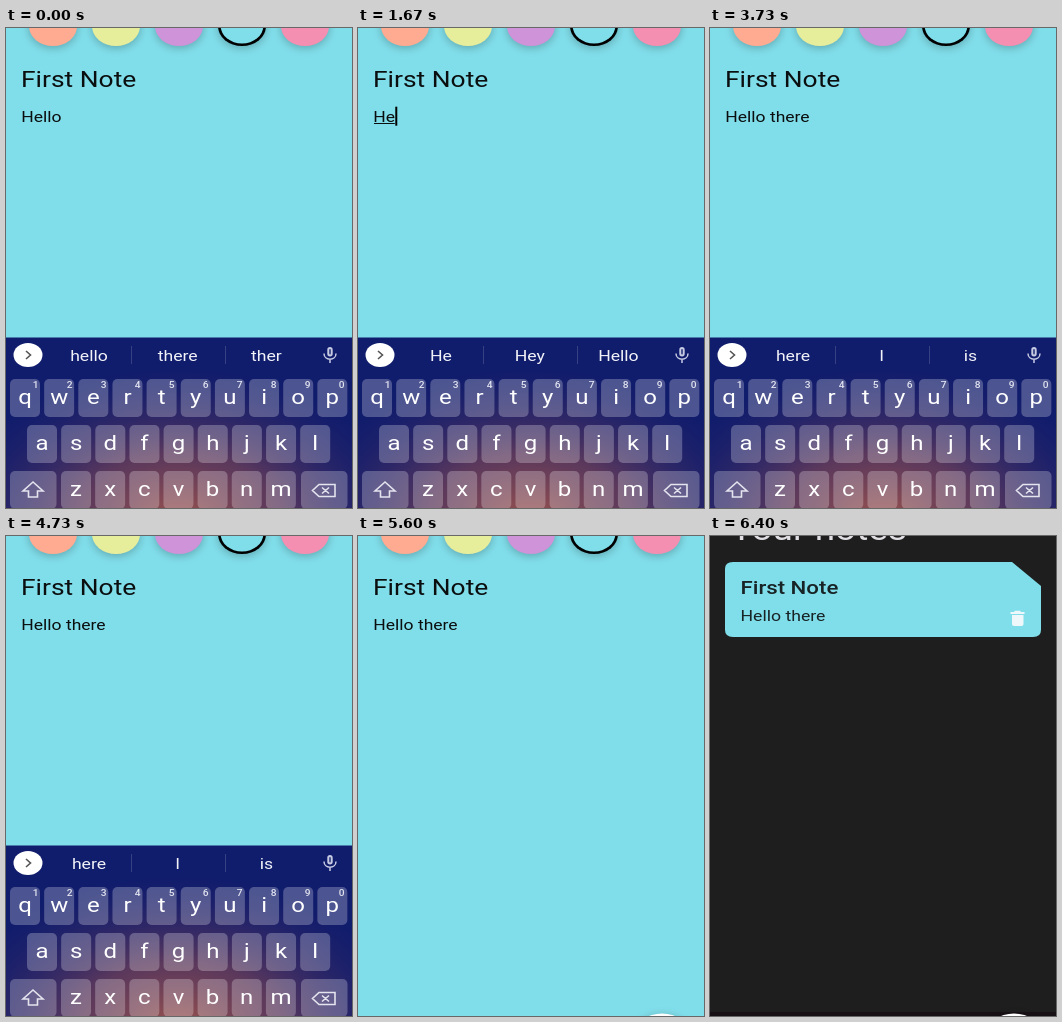
An HTML page with a canvas for the animation above (6470 ms loop, 346 by 480 pixels).

```html
<!DOCTYPE html>
<html lang="en">
<head>
<meta charset="utf-8">
<title>Note taking</title>
<style>
html, body { margin: 0; height: 100%; overflow: hidden; background: #80deea; }
canvas { display: block; width: 100vw; height: 100vh; }
</style>
</head>
<body>
<canvas></canvas>
<script>
const W = 346, H = 480, LOOP = 6470;
const STRETCH = 1.2;                 // the screen is squeezed vertically
const FONT = 'Roboto, Arial, sans-serif';
const TEAL = '#80deea', INK = '#0a0e0f', KEY = 'rgba(255,255,255,.25)', ICON = '#e4e4ee';
const PITCH = 34.15;
const canvas = document.querySelector('canvas');
const ctx = canvas.getContext('2d');
const dpr = window.devicePixelRatio || 1;
canvas.width = W * dpr;
canvas.height = H * dpr;

// start time, text, suggestions; the caret blinks from each start
const typing = [
  [-600, 'Hello ', ['hello', 'there', 'ther']],
  [70, 'H', ['He', 'Hey', 'Hello']],
  [600, 'He', ['He', 'Hey', 'Hello']],
  [2320, 'Hello ', ['hello', 'there', 'ther']],
  [3050, 'Hello there ', ['here', 'I', 'is']]
];
const HIDE = 5240, BLUR = 5550;      // keyboard starts to leave, field loses focus
const taps = [[2200, 267], [2930, 172]];
const swipes = [5000, 5800];

const span = (t, from, to) => Math.min(1, Math.max(0, (t - from) / (to - from)));

function text(str, x, y, size, color, align = 'left', weight = 400) {
  ctx.save();
  ctx.translate(x, y);
  ctx.scale(STRETCH, 1);
  ctx.font = `${weight} ${size}px ${FONT}`;
  ctx.textAlign = align;
  ctx.fillStyle = color;
  ctx.fillText(str, 0, 0);
  const width = ctx.measureText(str).width * STRETCH;
  ctx.restore();
  return width;
}

function rect(x, y, w, h, color, r = 0) {
  ctx.beginPath();
  ctx.roundRect(x, y, w, h, r);
  ctx.fillStyle = color;
  ctx.fill();
}

function oval(x, y, rx, ry, color) {
  ctx.beginPath();
  ctx.ellipse(x, y, rx, ry, 0, 0, 7);
  ctx.fillStyle = color;
  ctx.fill();
}

function line(d, color, width) {
  ctx.strokeStyle = color;
  ctx.lineWidth = width;
  ctx.stroke(new Path2D(d));
}

function withShadow(draw) {
  ctx.save();
  ctx.shadowColor = 'rgba(0,0,0,.25)';
  ctx.shadowBlur = 9 * dpr;
  ctx.shadowOffsetY = 2 * dpr;
  draw();
  ctx.restore();
}

const fab = () => withShadow(() => oval(304, 498, 27, 20.5, '#fff'));

function note(t, [start, str]) {
  rect(0, 0, W, H, TEAL);
  ['#ffab91', '#e6ee9c', '#ce93d8', '#000', '#f48fb1'].forEach((color, i) =>
    withShadow(() => oval(47 + 63 * i, -2, 24, 20, color)));
  oval(236, -2, 21.3, 17.5, TEAL);
  text('First Note', 15, 59.4, 22, INK);

  const width = text(str, 15.3, 93.6, 14.6, INK);
  if (!str.endsWith(' ')) rect(16, 95, width - 1, 1, INK);
  if ((t - start) % 1000 < 500 && t < BLUR) rect(15.5 + width, 78.7, 2, 19, '#000');
  fab();
}

function keyRow(letters, x, y) {
  [...letters].forEach((c, i) => {
    const cx = x + PITCH * i;
    rect(cx - 15, y, 30, 38, KEY, 5);
    text(c, cx, y + 25, 20, '#fff', 'center');
  });
}

function keyboard(suggestions) {
  rect(0, 309.6, W, 180, '#101c6c');
  ctx.save();
  ctx.translate(172, 495);
  ctx.scale(1.5, 1);
  const glow = ctx.createRadialGradient(0, 0, 0, 0, 0, 155);
  glow.addColorStop(0, 'rgba(162,86,76,.97)');
  glow.addColorStop(.45, 'rgba(128,70,84,.66)');
  glow.addColorStop(1, 'rgba(60,44,105,0)');
  ctx.fillStyle = glow;
  ctx.fillRect(-150, -170, 300, 170);
  ctx.restore();

  oval(22, 327, 14.5, 12, '#fff');
  line('M20 323 l4.5 4 l-4.5 4', '#555', 1.6);
  if (suggestions.length) {
    [125, 219].forEach(x => rect(x, 318, 1, 18, 'rgba(255,255,255,.16)'));
    suggestions.forEach((s, i) => text(s, 83 + 88.7 * i, 332.7, 14.7, '#f2f3f8', 'center'));
  }
  rect(321.3, 319, 5.4, 9.5, '#c6cae3', 2.7);
  rect(323.1, 321, 1.8, 5.5, '#3c4685', 1);
  line('M318 325.5 C318 333 330 333 330 325.5 M324 331 V335', '#c6cae3', 1.5);

  keyRow('qwertyuiop', 19, 351);
  [...'1234567890'].forEach((n, i) =>
    text(n, 29.7 + 34 * i, 359.5, 8.5, '#e2e4f0', 'center', 500));
  keyRow('asdfghjkl', 36, 397);
  keyRow('zxcvbnm', 70, 443);
  [4, 295].forEach(x => rect(x, 443, 46.5, 38, KEY, 5));
  line('M27 454 L37 463 H31.5 V469 H22.5 V463 H17 Z', ICON, 1.6);
  line('M313 456.5 H329 V468.5 H313 L306.5 462.5 Z M316 459.5 l7 6 M323 459.5 l-7 6', ICON, 1.6);
}

function list() {
  rect(0, 0, W, H, '#1e1e1e');
  text('Your notes', 20.5, 4, 30.8, '#e2dfe4');
  ctx.fillStyle = TEAL;
  ctx.fill(new Path2D('M23 26 H302 L331 50 V94 Q331 101 323 101 H23 Q15 101 15 94 V33 Q15 26 23 26 Z'));
  text('First Note', 30.5, 58, 18.5, '#172325', 'left', 500);
  text('Hello there', 30.5, 84.7, 14.7, '#172325');
  rect(300.5, 76, 14, 2, '#eef8fb');
  rect(304.5, 74.8, 6, 2, '#eef8fb');
  rect(302, 79, 11.5, 11, '#eef8fb', [0, 0, 2, 2]);
  rect(0, 476, W, 4, '#171015');
  fab();
}

function touch(x, y, alpha) {
  oval(x, y, 11, 8.8, `rgba(225,235,250,${.4 * alpha})`);
  oval(x, y, 7.5, 6, `rgba(225,235,250,${.4 * alpha})`);
}

function backSwipe(t) {
  if (t < 0 || t > 400) return;
  const depth = 24 * span(t, 0, 150) * (1 - span(t, 200, 380));
  const x = W - depth;
  ctx.fillStyle = 'rgba(22,34,38,.85)';
  ctx.fill(new Path2D(`M346 213 C346 248 ${x} 260 ${x} 300 C${x} 340 346 352 346 387 Z`));
  if (depth > 12) line(`M${x + 15} 297 l-3 3 l3 3`, '#fff', 1.2);
  touch(342 - 102 * span(t, 0, 250), 300, 1 - span(t, 270, 400));
}

function draw(t) {
  ctx.setTransform(dpr, 0, 0, dpr, 0, 0);
  const state = typing.findLast(s => s[0] <= t);
  note(t, state);

  const hide = span(t, HIDE, HIDE + 220);
  if (hide < 1) {
    ctx.save();
    ctx.globalAlpha = 1 - .7 * hide;
    ctx.translate(0, 180 * hide * hide);
    keyboard(hide ? [] : state[2]);
    ctx.restore();
  }
  ctx.globalAlpha = span(t, 6060, 6260);
  list();
  ctx.globalAlpha = 1;

  for (const [start, x] of taps)
    if (t > start) touch(x, 330, 1 - span(t, start + 200, start + 330));
  swipes.forEach(start => backSwipe(t - start));
}

const begin = performance.now();
function tick() {
  draw((performance.now() - begin) % LOOP);
  requestAnimationFrame(tick);
}
tick();
</script>
</body>
</html>
```
